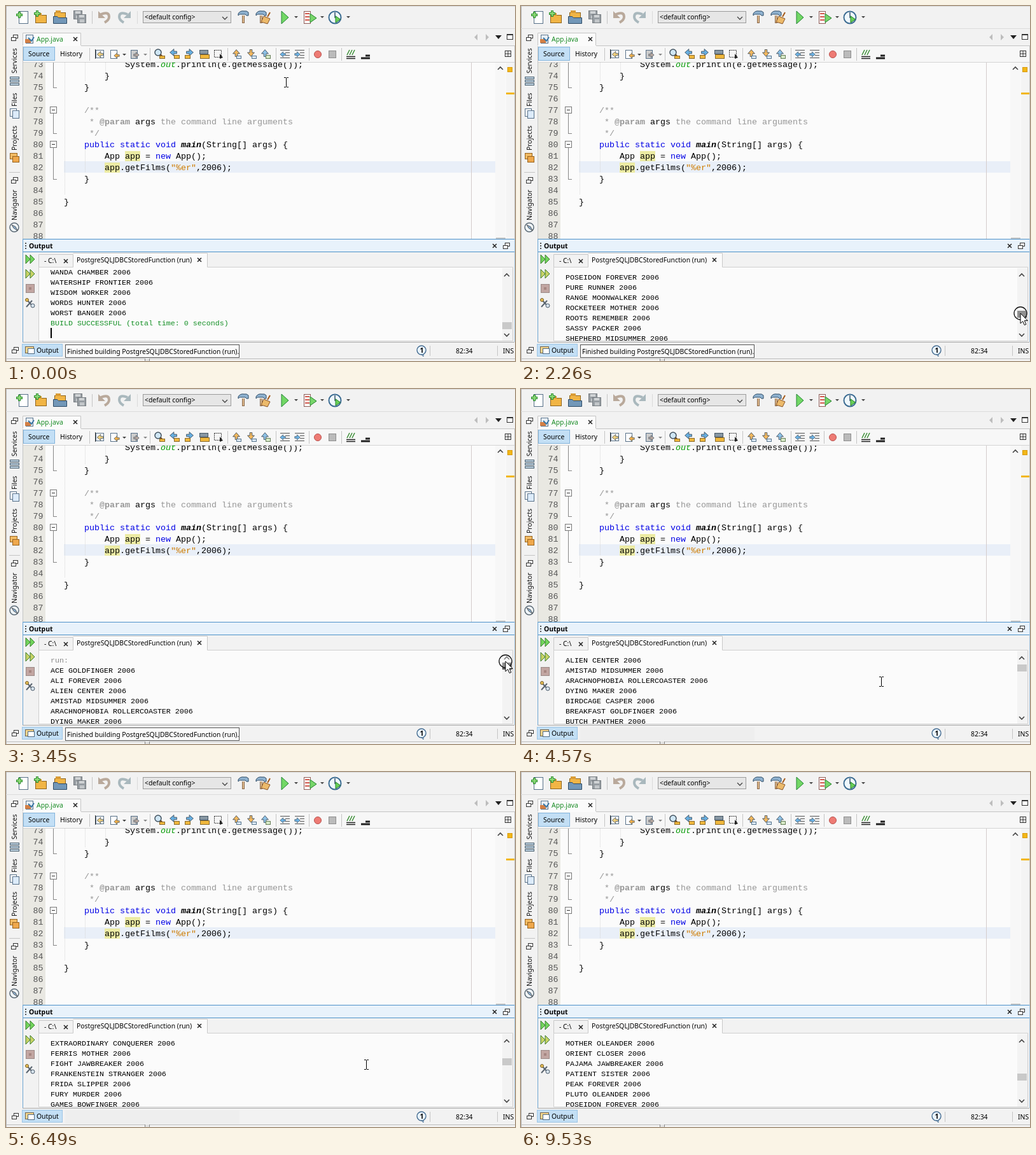
Animation of 800x558 px, one loop 9630 ms. Source, as an HTML page:

```html
<!DOCTYPE html>
<html lang="en">
<head>
<meta charset="utf-8">
<title>IDE output scrolling</title>
<style>
html, body { margin: 0; width: 100%; height: 100%; overflow: hidden; background: #f2f2f2; }
svg { display: block; width: 100vw; height: 100vh; }
text { font: 10.4px "Noto Sans", "Open Sans", sans-serif; white-space: pre; }
.code { font: 13.333px "Liberation Mono", "Courier New", monospace; }
.out { font: 11.667px "Liberation Mono", "Courier New", monospace; }
.bold { font-weight: bold; }
</style>
</head>
<body>
<svg id="stage" viewBox="0 0 800 558" xmlns="http://www.w3.org/2000/svg"></svg>
<script>
const LOOP = 9630, LINE = 16;

const films = `ACE GOLDFINGER,ALI FOREVER,ALIEN CENTER,AMISTAD MIDSUMMER,ARACHNOPHOBIA ROLLERCOASTER,DYING MAKER,BIRDCAGE CASPER,
BREAKFAST GOLDFINGER,BUTCH PANTHER,CAMPUS REMEMBER,CASABLANCA SUPER,CINCINATTI WHISPERER,DANCING FEVER,DARN FORRESTER,
DIVIDE MONSTER,DWARFS ALTER,EVOLUTION ALTER,EXTRAORDINARY CONQUERER,FERRIS MOTHER,FIGHT JAWBREAKER,FRANKENSTEIN STRANGER,
FRIDA SLIPPER,FURY MURDER,GAMES BOWFINGER,GLEAMING JAWBREAKER,GOLD RIVER,IDENTITY LOVER,HANKY OCTOBER,HEAD STRANGER,
HEDWIG ALTER,HIGHBALL POTTER,HOMEWARD CIDER,HUNTER ALTER,ISHTAR ROCKETEER,LOSER HUSTLER,MAGNOLIA FORRESTER,
MEMENTO ZOOLANDER,MISSION ZOOLANDER,MOTHER OLEANDER,ORIENT CLOSER,PAJAMA JAWBREAKER,PATIENT SISTER,PEAK FOREVER,
PLUTO OLEANDER,POSEIDON FOREVER,PURE RUNNER,RANGE MOONWALKER,ROCKETEER MOTHER,ROOTS REMEMBER,SASSY PACKER,
SHEPHERD MIDSUMMER,SILVERADO GOLDFINGER,SNATCH SLIPPER,SNOWMAN ROLLERCOASTER,SPARTACUS CHEAPER,SUNSET RACER,TIES HUNGER,
TOMORROW HUSTLER,TRACY CIDER,TRANSLATION SUMMER,UNFORGIVEN ZOOLANDER,VALLEY PACKER,WAIT CIDER,WANDA CHAMBER,
WATERSHIP FRONTIER,WISDOM WORKER,WORDS HUNTER,WORST BANGER`.split(/,\s*/);

// Markup helpers
const esc = s => s.replace(/&/g, '&amp;').replace(/</g, '&lt;');
const rect = (x, y, w, h, fill, stroke = 'none', more = '') =>
  `<rect x="${x}" y="${y}" width="${w}" height="${h}" fill="${fill}" stroke="${stroke}" ${more}/>`;
const box = (x, y, w, h, fill, stroke, more) => rect(x + .5, y + .5, w - 1, h - 1, fill, stroke, more);
const path = (d, stroke, fill = 'none', w = 1) =>
  `<path d="${d}" stroke="${stroke}" fill="${fill}" stroke-width="${w}"/>`;
const circle = (x, y, r, fill, stroke = 'none', w = 1) =>
  `<circle cx="${x}" cy="${y}" r="${r}" fill="${fill}" stroke="${stroke}" stroke-width="${w}"/>`;
const text = (x, y, s, fill = '#000', more = '') => `<text x="${x}" y="${y}" fill="${fill}" ${more}>${esc(s)}</text>`;
const at = (x, y, s) => `<g transform="translate(${x} ${y})">${s}</g>`;
const vline = (x, y, y2, c = '#c4c4c4') => rect(x, y, 1, y2 - y, c);
const hline = (x, x2, y, c = '#c4c4c4') => rect(x, y, x2 - x, 1, c);
const drop = (x, y, c = '#444') => path(`M${x - 3} ${y - 1}h6l-3 3z`, 'none', c);
const cross = (x, y) => path(`M${x - 3} ${y - 3}l6 6m0-6l-6 6`, '#222', 'none', 1.5);
const chevron = (x, y, k) => path(`M${x - 4} ${y + 2 * k}l4 ${-4 * k}l4 ${4 * k}`, '#444', 'none', 1.6);
const restore = (x, y) => box(x - 2, y - 5, 8, 6, '#fff', '#333') + box(x - 5, y - 1, 8, 6, '#fff', '#333');
const play = (x, y, c, k = 1) => path(`M${x - 4 * k} ${y - 7 * k}l${10 * k} ${7 * k}l${-10 * k} ${7 * k}z`, '#24812a', c);
const plus = (x, y) => path(`M${x - 5} ${y}h10m-5-5v10`, '#2b8b2f', 'none', 4) + path(`M${x - 4} ${y}h8m-4-4v8`, '#8fdc78', 'none', 2);
const page = (x, y, w = 11, h = 14, c = '#fff') => box(x, y, w, h, c, '#587189');
const lens = (x, y) => path(`M${x + 2} ${y + 2}l5 5`, '#7b4a18', 'none', 3) + circle(x - 1, y - 1, 5, '#cfe6f5', '#42525f', 1.5);
const arrowShape = 'M-6-2h5v-4l7 6l-7 6v-4h-5z';
const arrow = (x, y, c, turn = 0, k = 1) =>
  `<path d="${arrowShape}" transform="translate(${x} ${y}) rotate(${turn}) scale(${k})" fill="${c}" stroke="#44525f"/>`;

function mainToolbar() {
  const hammer = path('M0-2v12', '#8a6a4c', 'none', 4) + path('M0-2v11', '#dcb88c', 'none', 2) +
    path('M-8-5q3-5 9-4h4l3 2v5h-3l-2-2h-6q-3-1-5 2z', '#2f4c66', '#8fb2d0');
  const folder = (x, y) => box(x, y, 18, 13, '#f1b545', '#8f641d') + rect(x + 2, y - 3, 8, 4, '#d99b35');
  const disk = (x, y) => box(x, y, 14, 14, '#989ea3', '#777d82') + rect(x + 3, y + 1, 8, 4, '#d0d3d5') + rect(x + 4, y + 8, 7, 5, '#c2c6c9');
  return page(20, 8, 15, 20) + plus(21, 14) +
    folder(46, 14) + plus(49, 12) +
    folder(76, 10) + path('M74.500 27.500v-11h6l2 2h13v9z', '#2d4a66', '#7297b8') +
    disk(106, 7) + disk(112, 13) + vline(135, 8, 28) +
    path('M149 13q13-5 13 4q0 5-7 9', '#b9a99b', 'none', 4) + path('M145 8v11h11z', 'none', '#b9a99b') +
    path('M191 13q-13-5-13 4q0 5 7 9', '#a9b8bd', 'none', 4) + path('M196 8v11h-11z', 'none', '#a9b8bd') +
    vline(206, 8, 28, '#dadada') +
    box(215, 8, 139, 19, '#e6e6e6', '#9b9b9b') + text(218, 21, '<default config>') +
    path('M340 17l4 4l4-4', '#444', 'none', 1.3) +
    at(373, 17, hammer) + at(401, 17, hammer) + path('M405 16l10 4l-4 8l-10-3z', '#885326', '#ecba6b') +
    path('M411 17l4-7', '#a55b1b', 'none', 2) +
    path('M433 8v20l11-10z', '#238335', '#72d765') + drop(456, 17) +
    box(468, 8, 11, 20, '#fff', '#8e5b56') + path('M470 12h7m-7 5h7m-7 5h7', '#d25b50', 'none', 2) + play(482, 19, '#78d66a') + drop(497, 17) +
    circle(517, 18, 9.5, '#eef7fc', '#3c6c92', 2) + path('M517 10v8h4', '#34516a', 'none', 1.5) + play(521, 21, '#69d057', .75) + drop(538, 17);
}

function editorToolbar() {
  const find = '#f0b83d', blue = '#66aee0';
  return box(27, 64, 50, 22, '#c3dff5', '#83b4dc') + text(35, 79, 'Source') + text(85, 79, 'History') + vline(131, 66, 86) +
    page(141, 69, 13, 13) + vline(140, 68, 83, '#333') + arrow(148, 76, '#f0cf7c', 180, .8) +
    page(164, 69) + arrow(174, 78, '#f2b14b', 180, .7) + drop(186, 76) +
    page(196, 69, 11, 14, '#ccc') + arrow(205, 77, '#b9a9a1', 0, .7) + drop(219, 76, '#888') + vline(226, 66, 86) +
    lens(240, 74) + box(241, 78, 9, 5, find, '#8a6a2a') +
    arrow(263, 73, blue, 180, .9) + box(264, 77, 9, 6, find, '#8a6a2a') +
    arrow(289, 73, blue, 0, .9) + box(281, 77, 9, 6, find, '#8a6a2a') +
    box(304, 69, 14, 7, '#8797a3', '#475663') + box(305, 76, 15, 7, find, '#8a6a2a') +
    box(327, 69, 12, 12, '#f5f5f5', '#333', 'stroke-dasharray="2 1"') + path('M336 75v8l5-2z', 'none', '#222') + vline(348, 66, 86) +
    arrow(362, 74, '#f3b85d', -90, .9) + box(362, 78, 8, 5, '#dce9f5', '#56758e') +
    arrow(385, 74, '#f3b85d', 90, .9) + box(386, 78, 8, 5, '#dce9f5', '#56758e') +
    arrow(407, 74, '#8dc2e7', -90, .9) + box(408, 77, 8, 6, '#d7e9c7', '#667e58') + vline(424, 66, 86) +
    [431, 454].map((x, i) => path(`M${x} 69.500h15m-7 4h7m-7 4h7m-15 4h15`, '#555') + arrow(x + 4, 76, '#6db5e8', i ? 0 : 180, .7)).join('') + vline(476, 66, 86) +
    circle(490, 76, 5.5, '#ee7b74', '#b9524f') + box(507, 70, 12, 12, '#bbb', '#8e8e8e') + vline(527, 66, 86) +
    path('M535 79.500h14m-14 3h14', '#222', 'none', 1.4) + path('M536 77l4-8m0 8l4-8m0 8l4-8', '#3c8f36', 'none', 1.5) +
    path('M558 82h14m-7-4h7', '#222', 'none', 3) +
    box(784, 70, 10, 10, '#fff', '#333') + path('M789 71v9m-5-5h10', '#333');
}

function sidebar() {
  const label = (s, y) => text(0, 0, s, '#111', `transform="translate(17 ${y}) rotate(-90)"`);
  return restore(13, 50) + label('Services', 106) + [111, 116, 121].map(y => box(6, y, 15, 4, '#c0d3e2', '#4b6171')).join('') +
    label('Files', 158) + page(6, 161, 11, 13) + page(10, 164, 11, 13, '#dcebfa') +
    label('Projects', 227) + box(6, 231, 12, 10, '#f2bb64', '#97631f') + box(10, 236, 11, 10, '#efa84c', '#97631f') +
    hline(5, 22, 261) + restore(13, 274) + label('Navigator', 337) +
    circle(13, 348, 7, '#eef4f8', '#5d6b76', 1.5) + path('M9 344l6 3l3 6l-6-4z', '#555', '#8bb2d6');
}

function editor() {
  const base = n => 258 + (n - 82) * 18;
  const kw = '#0000e6', note = '#969696', str = '#ce7b00';
  const code = (n, col, ...parts) => `<text class="code" x="${91 + 8 * col}" y="${base(n)}">` +
    parts.map(([s, c = '#000', style = '']) => `<tspan fill="${c}" style="${style}">${esc(s)}</tspan>`).join('') + '</text>';
  const guide = (x, y, y2) => `<path d="M${x + .5} ${y}V${y2}" stroke="#d6d6d6" stroke-dasharray="1 1"/>`;
  const fold = (y, y2) => vline(74, y, y2, '#888') + hline(74, 80, y2, '#888');
  const toggle = y => box(69, y, 11, 11, '#fff', '#777') + hline(72, 77, y + 5, '#333');
  let s = rect(27, 89, 772, 277, '#fbfbfb') + rect(27, 89, 35, 277, '#e9e8e2') + rect(91, 244, 678, 18, '#e9eff8') +
    vline(731, 89, 366, '#d4cccc') + guide(92, 89, 296) + guide(124, 89, 118) + guide(156, 89, 118) + guide(124, 226, 262) +
    rect(187, 228, 24, 16, '#ecebA3') + rect(155, 246, 24, 16, '#ecebA3');
  for (let n = 73; n <= 88; n++) s += text(58.5, base(n), n + '', '#555', 'class="code" text-anchor="end"');
  s += fold(89, 128) + fold(168, 200) + fold(222, 272) + toggle(158) + toggle(212) +
    code(73, 12, ['System.'], ['out', '#009900', 'font-style:italic'], ['.println(e.getMessage());']) +
    code(74, 8, ['}']) + code(75, 4, ['}']) + code(77, 4, ['/**', note]) +
    code(78, 4, [' * ', note], ['@param', note, 'font-weight:bold'], [' args'], [' the command line arguments', note]) +
    code(79, 4, [' */', note]) +
    code(80, 4, ['public static void ', kw], ['main', '#000', 'font-weight:bold;font-style:italic'], ['(String[] args) {']) +
    code(81, 8, ['App app = '], ['new', kw], [' App();']) +
    code(82, 8, ['app.getFilms('], ['"%er"', str], [',2006);']) +
    code(83, 4, ['}']) + code(85, 0, ['}']) +
    rect(769, 89, 16, 277, '#f7f7f7') + chevron(777, 98, 1) + rect(770, 364, 15, 2, '#c6c6c6') +
    rect(786, 89, 13, 277, '#f4f4f4') + box(788, 96, 8, 8, '#f2b718', '#d99a0a') + rect(786, 136, 13, 3, '#f2b718');
  return `<g clip-path="url(#editorClip)">${s}</g>`;
}

function outputPane() {
  const ahead = (y, c) => path(`M31 ${y - 7}l7 7l-7 7zM38 ${y - 7}l7 7l-7 7z`, '#3c7d31', c);
  const rows = ['run:', ...films.map(f => f + ' 2006'), 'BUILD SUCCESSFUL (total time: 0 seconds)'];
  const tint = i => i === 0 ? '#8a8a8a' : i === rows.length - 1 ? '#159026' : '#000';
  return rect(27, 366, 772, 162, '#f2f2f2') + rect(27, 367, 772, 19, '#e8f2fb') + hline(26, 799, 366, '#4c91c8') + hline(26, 799, 386, '#4c91c8') +
    vline(26, 366, 528, '#6da5d2') + vline(799, 366, 528, '#a6c5df') + hline(26, 799, 528, '#a9a9a9') +
    [372, 376, 380].map(y => rect(30, y, 2, 2, '#555')).join('') + text(36, 381, 'Output', '#000', 'class="bold"') +
    cross(768, 377) + restore(786, 377) +
    rect(106, 388, 211, 24, '#fbfbfb') + path('M51.5 410.5v-20h54v20m0-22h211v22', '#c8c8c8') +
    text(60, 404, '- C:\\') + cross(94, 401) + text(111, 403, 'PostgreSQLJDBCStoredFunction (run)') + cross(304, 399) +
    rect(51, 411, 746, 116, '#fbfbfb') + path('M105.5 410.5h-54v116h745v-116h-480', '#cfcfcf') +
    ahead(398, '#71d45c') + ahead(421, '#c7d266') + box(31, 437, 14, 14, '#c2a6a2', '#9b8a87') + rect(36, 442, 4, 4, '#a68782') +
    path('M32 473l9-10m-9-2l11 12', '#5a6570', 'none', 2) + circle(33, 462, 2.5, '#e7bd54', '#705c2c') + circle(42, 471, 3, '#d5e1ec', '#4d5d6c') +
    rect(780, 412, 16, 114, '#f3f3f3') + chevron(787, 423, 1) + chevron(787, 517, -1) + rect(780, 0, 15, 11, '#c9c9c9', 'none', 'id="thumb"') +
    `<g clip-path="url(#outputClip)"><g id="log">` +
    rows.map((r, i) => text(70, 430 + LINE * i, r, tint(i), 'class="out"')).join('') +
    rect(70, 418 + LINE * rows.length, 2, 16, '#000', 'none', 'id="caret"') + '</g></g>';
}

function statusBar() {
  return restore(14, 541) + box(25, 531, 64, 20, '#c3dff5', '#9cc5e6') +
    box(30, 535, 14, 11, '#f4d58e', '#73634b') + box(34, 538, 11, 9, '#fff', '#4c6a82') + text(48, 545, 'Output') +
    rect(93, 532, 274, 21, '#eeeeee', 'none', 'id="faded"') +
    `<g id="tip">${box(93, 532, 274, 21, '#fafafa', '#555')}${text(96, 547, 'Finished building PostgreSQLJDBCStoredFunction (run).')}</g>` +
    path('M652 547l4 4v-5', '#456c90', '#eaf5ff') + circle(653, 541, 7, '#eaf5ff', '#456c90', 1.4) +
    text(650.5, 545, '1', '#000', 'class="bold"') + vline(666, 534, 550) + text(707, 546, '82:34') +
    vline(772, 534, 550) + text(781, 546, 'INS') + hline(0, 800, 554, '#bdbdbd') + rect(219, 554, 7, 4, '#e2e2e2') + vline(218, 554, 558, '#888') + vline(225, 554, 558, '#888');
}

function tabRow() {
  return rect(26, 42, 92, 21, '#fbfbfb') + path('M26.5 62v-19.500h91v19.500', '#c4c4c4') + page(31, 45, 12, 14, '#e6eef5') +
    rect(30, 52, 9, 6, '#d37f45') + path('M35 50l5 5l4-6', '#3b78a6', 'none', 2) + text(48, 56, 'App.java', '#168a22') + cross(109, 52) +
    hline(118, 800, 62) + rect(27, 63, 772, 26, '#f7f7f7') + hline(27, 799, 88, '#d4d4d4') +
    path('M741 44v10l-5-5zM754 44v10l5-5z', 'none', '#bdbdbd') + path('M769 46h10l-5 6z', 'none', '#222') + box(787, 44, 10, 9, '#fff', '#333') + hline(787, 797, 45, '#333');
}

const pointer = `<g id="cursor">
  <circle id="ring" r="10" fill="#fff" fill-opacity=".3" stroke="#111" stroke-width="1.3"/>
  <path id="arrow" d="M0 0v16l3.700-3.500l2.600 6l2.600-1.100l-2.600-5.800h5z" fill="#fff" stroke="#000"/>
  <path id="beam" d="M-3-7.500h3m1 0h3M.5-7v14M-3 7.500h3m1 0h3" fill="none" stroke="#000"/></g>`;

const stage = document.getElementById('stage');
stage.innerHTML = `<defs><clipPath id="editorClip"><rect x="27" y="89" width="772" height="277"/></clipPath>
  <clipPath id="outputClip"><rect x="52" y="414" width="728" height="112"/></clipPath></defs>` +
  rect(0, 0, 800, 558, '#f2f2f2') + hline(0, 800, 0, '#d8d8d8') + vline(0, 0, 558, '#b5b5b5') + hline(0, 800, 35, '#dcdcdc') + vline(26, 42, 366) + vline(799, 62, 528) +
  mainToolbar() + tabRow() + editorToolbar() + sidebar() + editor() + outputPane() + statusBar() + pointer;

// Timelines of held values: [ms, value...]
const scroll = [[0, 1032], [1990, 968], [2120, 850], [2260, 720], [2390, 600], [2530, 472], [2650, 356], [2780, 220], [2900, 112], [3040, 40], [3170, 0],
  [4450, 32], [4570, 48], [4840, 80], [5420, 128], [5700, 176], [6100, 224], [6230, 240], [6490, 288], [6620, 336], [6890, 384], [7430, 432],
  [7840, 480], [8250, 528], [8670, 576], [8800, 608], [8930, 624]];
const moves = [[0, 'beam', 440, 120], [130, 'beam', 442, 135], [260, 'beam', 458, 228], [390, 'beam', 475, 345], [510, 'beam', 550, 436],
  [660, 'beam', 601, 450], [790, 'beam', 645, 461], [910, 'beam', 700, 468], [1040, 'beam', 730, 470], [1180, 'beam', 752, 482], [1310, 'beam', 768, 492],
  [1430, 'beam', 778, 497], [1580, 'arrow', 781, 500], [1860, 'press'], [3170, 'press', 785, 428], [3330, 'arrow', 785, 428], [3450, 'press', 785, 428],
  [3750, 'arrow', 785, 430], [3880, 'beam', 594, 455], [4030, 'beam', 340, 458], [4160, 'beam', 187, 446], [4450, 'beam', 566, 460], [9530, 'none', 0, 0]];
const blink = [[0, 1], [390, 0], [910, 1], [1310, 0], [1710, 1], [9530, 0]];
const thumbStops = [[0, 430], [128, 439], [432, 460], [624, 474], [1032, 497]];

const held = (table, t) => table.findLast(([from]) => from <= t);
function thumbTop(s) {
  const i = Math.max(1, thumbStops.findIndex(([v]) => v >= s));
  const [[a, y], [b, z]] = [thumbStops[i - 1], thumbStops[i]];
  return Math.round(y + (z - y) * (s - a) / (b - a));
}
const [log, thumb, caret, cursor, ring, arrowEl, beam, tip, faded] =
  ['log', 'thumb', 'caret', 'cursor', 'ring', 'arrow', 'beam', 'tip', 'faded'].map(id => document.getElementById(id));
const show = (node, on) => node.setAttribute('visibility', on ? 'visible' : 'hidden');

function draw(now) {
  const t = now % LOOP;
  const s = held(scroll, t)[1], top = thumbTop(s);
  const [, kind, x = 785, y = top + 4] = held(moves, t);
  log.setAttribute('transform', `translate(0 ${-s})`);
  thumb.setAttribute('y', top);
  thumb.setAttribute('fill', t >= 1860 && t < 4030 ? '#606060' : '#c9c9c9');
  cursor.setAttribute('transform', `translate(${x} ${y})`);
  show(caret, held(blink, t)[1]);
  show(beam, kind === 'beam');
  show(arrowEl, kind === 'arrow' || kind === 'press');
  show(ring, kind === 'press');
  show(tip, t < 4450);
  show(faded, t >= 4450 && t < 9530);
  requestAnimationFrame(() => draw(performance.now()));
}
draw(performance.now());
</script>
</body>
</html>
```
